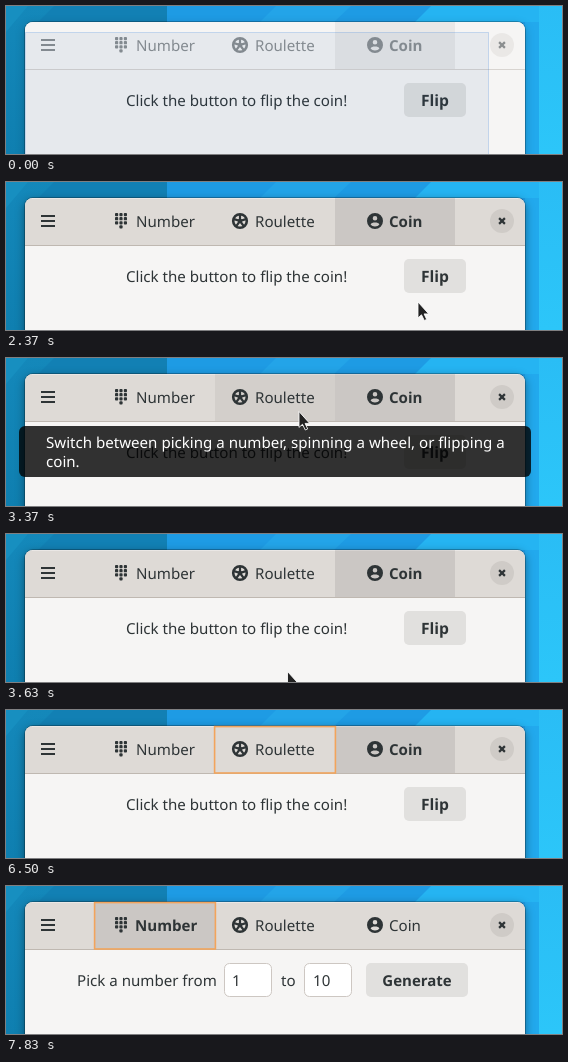
An HTML page that plays this animation: 556 by 148 pixels, repeating every 8000 ms.

```html
<!DOCTYPE html>
<html lang="en">
<head>
<meta charset="utf-8">
<title>Picker window</title>
<style>
html, body { margin: 0; width: 100%; height: 100%; overflow: hidden; background: #1b95d6; }
svg { display: block; width: 100vw; height: 100vh; }
text { font: 15.1px "Noto Sans", "Open Sans", sans-serif; fill: currentColor; white-space: pre; text-rendering: geometricPrecision; }
.bold { font-weight: 700; }
.push { font-size: 15.6px; text-anchor: middle; }
#bar { color: #2e3436; }
#bar.idle { color: #8b8e8f; }
.page { color: #2e3436; }
.btn { fill: #e1e0de; }
.entry { fill: #fff; stroke: #cdc7c2; }
.shadow { filter: blur(4px); }
</style>
</head>
<body>
<svg viewBox="0 0 556 148" xmlns="http://www.w3.org/2000/svg">
  <defs>
    <linearGradient id="west" x1="0" y1="0" x2="0" y2="1">
      <stop offset="0" stop-color="#1488ba"/><stop offset="1" stop-color="#0f7fb0"/>
    </linearGradient>
    <linearGradient id="east" x1="0" y1="0" x2="0" y2="1">
      <stop offset="0" stop-color="#2abdf5"/><stop offset="1" stop-color="#2cc6f9"/>
    </linearGradient>
  </defs>

  <g id="wallpaper">
    <path fill="url(#west)" d="M0 0H161V148H0Z"/>
    <path fill="#178fc0" d="M0 0H22L0 26Z"/>
    <path fill="#1280b4" d="M48 0H161V16H32Z"/>
    <path fill="#1e9be4" d="M161 0H556V148H161Z"/>
    <path fill="#23a4e8" d="M270 0H345L328 16H254Z"/>
    <path fill="#25b4f2" d="M425 0H556V148H519V16H409Z"/>
    <path fill="#22a9ed" d="M519 16H533V148H519Z"/>
    <path fill="url(#east)" d="M533 0H556V148H533Z"/>
  </g>

  <rect id="shade" class="shadow" x="18" y="18" width="502" height="160" rx="9"/>
  <path fill="none" stroke="#000" stroke-opacity=".25" d="M18.5 148V24A8.5 8.5 0 0 1 27 15.5H511A8.5 8.5 0 0 1 519.5 24V148"/>
  <path fill="#f6f5f4" d="M19 148V24A8 8 0 0 1 27 16H511A8 8 0 0 1 519 24V148Z"/>
  <path id="fill" d="M19 64V24A8 8 0 0 1 27 16H511A8 8 0 0 1 519 24V64Z"/>
  <path id="gloss" stroke="#fff" stroke-opacity=".35" d="M26 16.5H512"/>

  <rect id="tab0" x="88" y="16" width="121" height="47"/>
  <rect id="tab1" x="209" y="16" width="120" height="47"/>
  <rect id="tab2" x="329" y="16" width="120" height="47"/>
  <path id="rule" d="M19 63.5H519"/>

  <g id="bar">
    <path stroke="currentColor" stroke-width="2" d="M35 34H49M35 39H49M35 44H49"/>
    <g id="pad" fill="currentColor"></g>
    <g fill="none" stroke="currentColor">
      <circle cx="234" cy="39" r="6.8" stroke-width="2.6"/>
      <path id="spokes" stroke-width="2.2"/>
    </g>
    <circle cx="234" cy="39" r="2.3" fill="currentColor"/>
    <path fill="currentColor" fill-rule="evenodd" d="M361 39a8 8 0 1 0 16 0a8 8 0 1 0-16 0ZM366.7 36.2a2.3 2.3 0 1 1 4.6 0a2.3 2.3 0 1 1-4.6 0ZM364.6 42.6C365 41 367 40.5 369 40.5S373 41 373.4 42.6C372.4 43.8 371 44.5 369 44.5S365.6 43.8 364.6 42.6Z"/>
    <text id="name0" x="130" y="45">Number</text>
    <text x="249" y="45">Roulette</text>
    <text id="name2" x="383" y="45">Coin</text>
    <circle id="disc" cx="496" cy="39" r="12"/>
    <path stroke="currentColor" stroke-width="2.2" d="M493.1 36.1L498.9 41.9M498.9 36.1L493.1 41.9"/>
  </g>

  <path id="edge0" stroke="#f0ab70" d="M88.5 16V63"/>
  <path id="edge1" stroke="#bfb8b1" d="M209.5 16V63"/>
  <g fill="none" stroke="#f2a45c" stroke-width="1.6">
    <rect id="ring0" x="88.6" y="16.6" width="120.8" height="46.4"/>
    <rect id="ring1" x="208.6" y="16.6" width="120.8" height="46.4"/>
  </g>

  <g id="coin" class="page">
    <text x="120" y="100">Click the button to flip the coin!</text>
    <rect class="btn" x="398" y="77" width="62" height="34" rx="5"/>
    <text class="bold push" x="429" y="100">Flip</text>
  </g>
  <g id="number" class="page">
    <text x="71" y="100">Pick a number from</text>
    <rect class="entry" x="218.5" y="77.5" width="47" height="33" rx="5"/>
    <text x="226" y="100">1</text>
    <text x="275" y="100">to</text>
    <rect class="entry" x="298.5" y="77.5" width="47" height="33" rx="5"/>
    <text x="307" y="100">10</text>
    <rect class="btn" x="360" y="77" width="102" height="34" rx="5"/>
    <text class="bold push" x="411" y="100" style="font-size: 15px">Generate</text>
  </g>

  <g id="select">
    <path fill="#2a5a9a" fill-opacity=".08" d="M19 26H483V148H19Z"/>
    <path fill="none" stroke="#3584e4" stroke-opacity=".2" d="M19.5 148V26.5H482.5V148"/>
  </g>

  <g id="tip" color="#fff">
    <rect x="13" y="68" width="512" height="51" rx="6" fill-opacity=".8"/>
    <text x="40" y="90">Switch between picking a number, spinning a wheel, or flipping a</text>
    <text x="40" y="109">coin.</text>
  </g>
  <path id="cursor" fill="#222" stroke="#fff" stroke-opacity=".85" d="M.5 .5V16.4L4 13.3L6.8 19L9.2 17.9L6.6 12.4H11.2Z"/>
</svg>
<script>
const LOOP = 8000, STEP = 1000 / 15;
const $ = id => document.getElementById(id);
const set = (id, attrs) => { for (const k in attrs) $(id).setAttribute(k, attrs[k]); };
const show = (id, a) => set(id, { opacity: +a });
const ramp = (t, a, b) => Math.min(1, Math.max(0, (t - a) / (b - a)));
const ease = x => x * x * (3 - 2 * x);
const mix = (a, b, k) => a + (b - a) * k;

let dots = "";
for (let i = 0; i < 10; i++) {
  const col = i < 9 ? i % 3 : 1, row = i < 9 ? Math.floor(i / 3) : 3;
  dots += `<rect x="${109 + col * 4.4}" y="${31 + row * 4.1}" width="3.2" height="3.2" rx=".9"/>`;
}
$("pad").innerHTML = dots;

let spokes = "";
for (let i = 0; i < 5; i++) {
  const a = (i * .4 - .5) * Math.PI;
  spokes += `M234 39L${234 + 7 * Math.cos(a)} ${39 + 7 * Math.sin(a)}`;
}
set("spokes", { d: spokes });

function pointer(t) {
  if (t < 3360) {
    const k = ease(ramp(t, 2366, 2900));
    return [mix(411.5, 292.5, k), mix(119.5, 53, k)];
  }
  const k = ease(ramp(t, 3366, 3633));
  return [mix(292.5, 281, k), mix(53, 137, k) + 6 * ramp(t, 3700, 3767)];
}

function render(now) {
  const t = (Math.floor((now + 4) / STEP + .5) - .5) * STEP;
  const idle = t < 560;
  const swap = ease(ramp(t, 7166, 7433));
  const picked = t >= 7225;

  show("select", t < 95);
  $("bar").setAttribute("class", idle ? "idle" : "");
  set("fill", { fill: idle ? "#f6f5f4" : "#dedad6" });
  show("gloss", !idle);
  set("shade", { "fill-opacity": idle ? .2 : .36 });
  set("rule", { stroke: idle ? "#d8d4d0" : "#bfb8b1" });
  set("disc", { fill: idle ? "#eae8e6" : "#cfcbc7" });

  const hover = ramp(t, 2700, 2900) * (1 - ramp(t, 3400, 3566));
  const dark = idle ? .055 : .088;
  set("tab0", { "fill-opacity": dark * swap });
  set("tab1", { "fill-opacity": .05 * hover });
  set("tab2", { "fill-opacity": dark * (1 - swap) });
  $("name0").setAttribute("class", picked ? "bold" : "");
  set("name0", { x: picked ? 129 : 130 });
  $("name2").setAttribute("class", picked ? "" : "bold");

  // Keyboard focus: Number, Roulette, then back to Number.
  const right = ramp(t, 5370, 5500), back = ramp(t, 6500, 6700);
  const entering = t >= 5090 && t < 5225;
  show("edge0", entering);
  show("edge1", entering);
  show("ring0", ramp(t, 5100, 5233) * (1 - right) + back);
  show("ring1", right * (1 - back));

  show("coin", 1 - swap);
  show("number", swap);

  show("tip", t >= 3360 && t < 3495);
  const [x, y] = pointer(t);
  set("cursor", { transform: `translate(${x} ${y})` });
  show("cursor", t >= 2360 && t < 3825);
}

const start = performance.now();
function tick() {
  render((performance.now() - start) % LOOP);
  requestAnimationFrame(tick);
}
tick();
</script>
</body>
</html>
```
